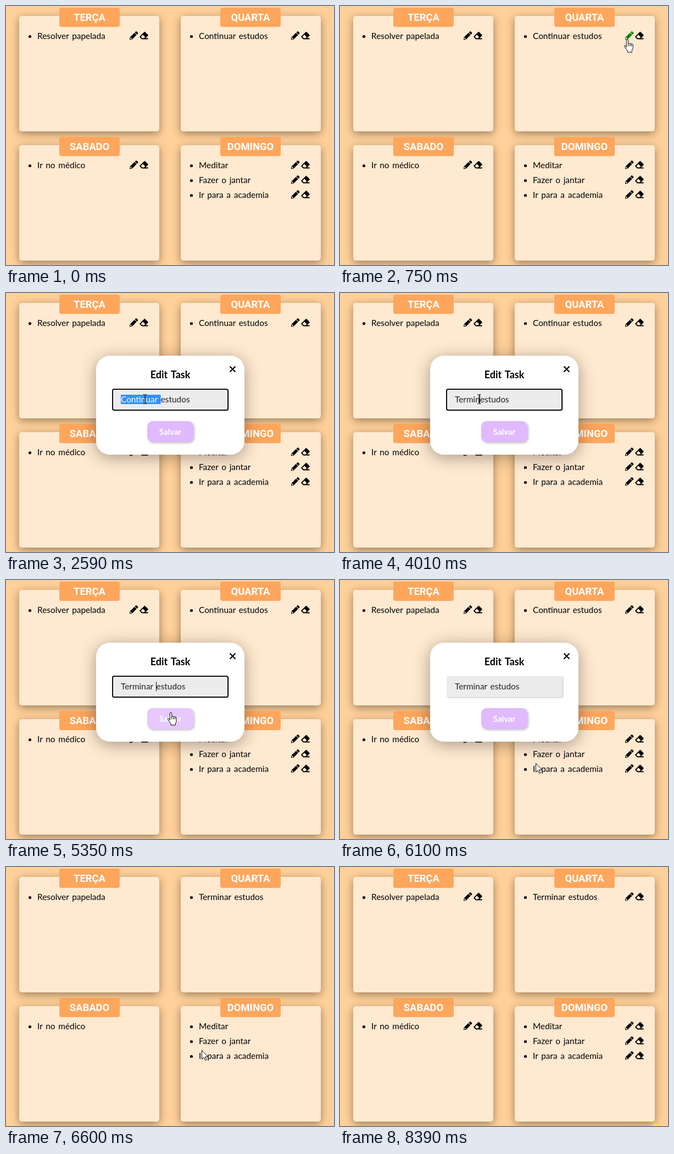
Write an HTML page that moves like this. It is 597 by 471 pixels and loops after 8.45 s.

```html
<!DOCTYPE html>
<html lang="pt">
<head>
<meta charset="utf-8">
<title>Tarefas da semana</title>
<style>
html, body { margin: 0; width: 100%; height: 100%; overflow: hidden; background: #ffd099; }
svg { display: block; width: 597px; height: 471px; }
text { font: 15.4px Lato, sans-serif; word-spacing: 1.8px; white-space: pre; }
.day { font: bold 18.4px Roboto, sans-serif; fill: #fff; text-anchor: middle; word-spacing: 0; }
.head { font-size: 18px; font-weight: bold; text-anchor: middle; }
.save { font-size: 15px; font-weight: bold; text-anchor: middle; fill: #fff; }
.card { fill: #ffe9d0; filter: drop-shadow(0 4px 8px rgba(0,0,0,.4)); }
.modal { fill: #fff; filter: drop-shadow(0 5px 15px rgba(0,0,0,.35)); }
.field { fill: #ececec; filter: drop-shadow(1px 1px 1px rgba(0,0,0,.25)); }
.btn { filter: drop-shadow(2px 2px 2px rgba(0,0,0,.25)); }
.cur { fill: #fff; stroke: #000; stroke-linejoin: round; }
</style>
</head>
<body>
<svg id="stage" viewBox="0 0 597 471">
  <defs>
    <path id="pencil" fill-rule="evenodd" transform="scale(.96)" d="M15.56 4.44l-1.44 1.44a.4.4 0 0 1-.5 0l-3.5-3.5a.4.4 0 0 1 0-.5L11.56.44a1.5 1.5 0 0 1 2.1 0l1.9 1.9a1.5 1.5 0 0 1 0 2.1zM8.9 3.1L.7 11.3 0 15.1a.75.75 0 0 0 .9.9l3.8-.7 8.2-8.2a.4.4 0 0 0 0-.5L9.4 3.1a.4.4 0 0 0-.5 0zM2.75 13.25h1.5v1.1l-2 .4-1-1 .4-2h1.1z"/>
    <path id="eraser" fill-rule="evenodd" transform="scale(.96)" d="M15.56 8.56a1.5 1.5 0 0 0 0-2.12l-5-5a1.5 1.5 0 0 0-2.12 0l-8 8a1.5 1.5 0 0 0 0 2.12l3 3A1.5 1.5 0 0 0 4.5 15h11.1a.4.4 0 0 0 .4-.4v-1.2a.4.4 0 0 0-.4-.4h-4.5zM6.1 6.6l4.3 4.3L8.3 13H4.7L2.2 10.5z"/>
  </defs>
  <rect width="597" height="471" fill="#ffd099"/>
  <g id="week"></g>
  <g id="reload"></g>
  <circle id="dot" cx="576" cy="480" r="12" fill="#ffe34a"/>
  <g id="modal">
    <rect class="modal" x="164" y="114" width="270" height="180" rx="25"/>
    <text class="head" x="299" y="155">Edit Task</text>
    <path d="M407.5 133.5l10 10m0-10l-10 10" stroke="#000" stroke-width="2.2"/>
    <rect class="field" x="194" y="175" width="211" height="38" rx="2"/>
    <rect id="focus" x="194" y="175" width="210" height="38" rx="3" fill="#ececec" stroke="#101010" stroke-width="2"/>
    <rect id="mark" x="209" y="185" height="17" fill="#3390ff"/>
    <text y="199" x="209" fill="#222"><tspan id="lead"></tspan><tspan>estudos</tspan></text>
    <rect id="caret" y="185" width="1" height="17"/>
    <rect id="btn" class="btn" x="257" y="233" width="84" height="38" rx="10"/>
    <text class="save" x="299" y="258">Salvar</text>
  </g>
  <g id="cursor">
    <path id="arrow" class="cur" d="M.5.5V16.5L4.1 13.2 6.6 18.6 8.9 17.6 6.5 12.2H11.6z"/>
    <path id="hand" class="cur" transform="translate(-6.2 -.5)" d="M4.5 14.5V2.3a1.7 1.7 0 0 1 3.4 0V8.2a1.6 1.6 0 0 1 3.1.6a1.5 1.5 0 0 1 2.9.7a1.4 1.4 0 0 1 2.6.8V15q0 3-2 5v3.5H6.5V21q-1-1-2.5-3.5L.8 13.2q-.6-1.5.6-1.9 1-.2 2 1zM7.9 8.2v4.5M11 8.8v4M13.9 9.5v3.5"/>
    <path id="beam" fill="none" stroke="#000" d="M-3 -8.500H-1L0 -7.500 1 -8.500H3M0 -7.500V7.500M-3 8.500H-1L0 7.500 1 8.500H3"/>
  </g>
</svg>
<script>
const $ = id => document.getElementById(id);
const LOOP = 8450;

const icon = (name, x, y) => `<g transform="translate(${x} ${y})"><use href="#${name}"/></g>`;

function card(x, y, w, day, items, mid = x + w / 2) {
  const rows = items.map((item, i) => {
    const top = y + 27 * i;
    return `<circle cx="${x + 19.5}" cy="${top + 37.500}" r="2.6"/>
      <text x="${x + 33}" y="${top + 42}">${item}</text>
      <g class="tools">${icon("pencil", x + 201, top + 28)}${icon("eraser", x + 219.3, top + 28)}</g>`;
  });
  return `<rect class="card" x="${x}" y="${y}" width="${w}" height="210" rx="5"/>
    <rect x="${mid - 55}" y="${y - 15}" width="110" height="35" rx="4" fill="#fda65c"/>
    <text class="day" x="${mid}" y="${y + 9}">${day}</text>${rows.join("")}`;
}

$("week").innerHTML =
  card(24, 18, 255, "TERÇA", ["Resolver papelada"], 152) +
  `<g id="wed">${card(318, 18, 255, "QUARTA", ["Continuar estudos"], 445)}</g>` +
  card(24, 253, 255, "SABADO", ["Ir no médico"], 152) +
  card(318, 253, 255, "DOMINGO", ["Meditar", "Fazer o jantar", "Ir para a academia"], 445);
$("reload").innerHTML =
  card(29, 18, 258, "TERÇA", ["Resolver papelada"]) +
  card(327, 18, 258, "QUARTA", ["Terminar estudos"]) +
  card(178, 253, 258, "SEXTA", ["Comprar almoço"]);
$("reload").querySelectorAll(".tools").forEach(g => g.remove());

const tools = document.querySelectorAll("#week .tools");
const task = document.querySelector("#wed text:not(.day)");
const editIcon = document.querySelector("#wed .tools g");

// start, end, then a quadratic curve: from, control, to
const moves = [
  [70, 820, 580, 122, 510, 112, 524, 58],
  [1620, 2460, 524, 58, 420, 165, 252.5, 193],
  [5000, 5120, 252.5, 193, 275, 215, 300, 241],
  [5930, 6100, 300, 241, 330, 285, 356, 333],
  [7580, 8090, 356, 333, 450, 400, 569, 474]
];
const keys = [3330, 3600, 3680, 3760, 3840, 4010, 4105, 4200, 4300];

function pointer(t) {
  const [a, b, x0, y0, cx, cy, x1, y1] = moves.filter(m => t >= m[0]).pop() || moves[0];
  const k = Math.max(0, Math.min(1, (t - a) / (b - a)));
  const e = k * k * (3 - 2 * k);
  const curve = (p, c, q) => (1 - e) * (1 - e) * p + 2 * e * (1 - e) * c + e * e * q;
  return [curve(x0, cx, x1), curve(y0, cy, y1)];
}

const show = (el, on) => el.style.display = on ? "" : "none";
const inside = (x, y, l, t, r, b) => x >= l && x <= r && y >= t && y <= b;

function draw(t) {
  const [x, y] = pointer(t);
  const open = t >= 1310 && t < 6540;
  const loading = t >= 6540 && t < 6570;
  const onPencil = t < 6540 && t >= 70 && inside(x, y, 518, 45, 535, 62);
  const onField = open && inside(x, y, 194, 175, 405, 213);
  const onBtn = open && inside(x, y, 257, 233, 341, 271);

  show($("week"), !loading);
  show($("reload"), loading);
  tools.forEach(g => show(g, t < 6540 || t >= 6870));
  task.textContent = t < 6540 ? "Continuar estudos" : "Terminar estudos";
  editIcon.setAttribute("fill", onPencil ? "#008000" : "#000");

  show($("modal"), open);
  if (open) {
    const typed = keys.filter(k => t >= k).length;
    const marked = t >= 2530 && !typed;
    const lead = $("lead");
    lead.textContent = typed ? "Terminar ".slice(0, typed) : "Continuar ";
    lead.setAttribute("fill", marked ? "#fff" : "#222");
    const w = lead.getComputedTextLength();
    $("mark").setAttribute("width", w);
    $("caret").setAttribute("x", Math.round(209 + w - 0.5));
    show($("mark"), marked);
    show($("caret"), typed && t < 5550 && (t < 4850 || t >= 5350));
    show($("focus"), t >= 2430 && t < 5550);
    $("btn").setAttribute("fill", onBtn ? "#e7c8ff" : "#e0b9ff");
  }

  show($("cursor"), t >= 70 && t < 8090);
  $("cursor").setAttribute("transform", `translate(${Math.round(x)} ${Math.round(y)})`);
  show($("hand"), onPencil || onBtn);
  show($("beam"), onField);
  show($("arrow"), !onPencil && !onBtn && !onField);
  show($("dot"), t >= 8390);
}

const start = performance.now();
function tick() {
  draw((performance.now() - start) % LOOP);
  requestAnimationFrame(tick);
}
tick();
</script>
</body>
</html>
```
